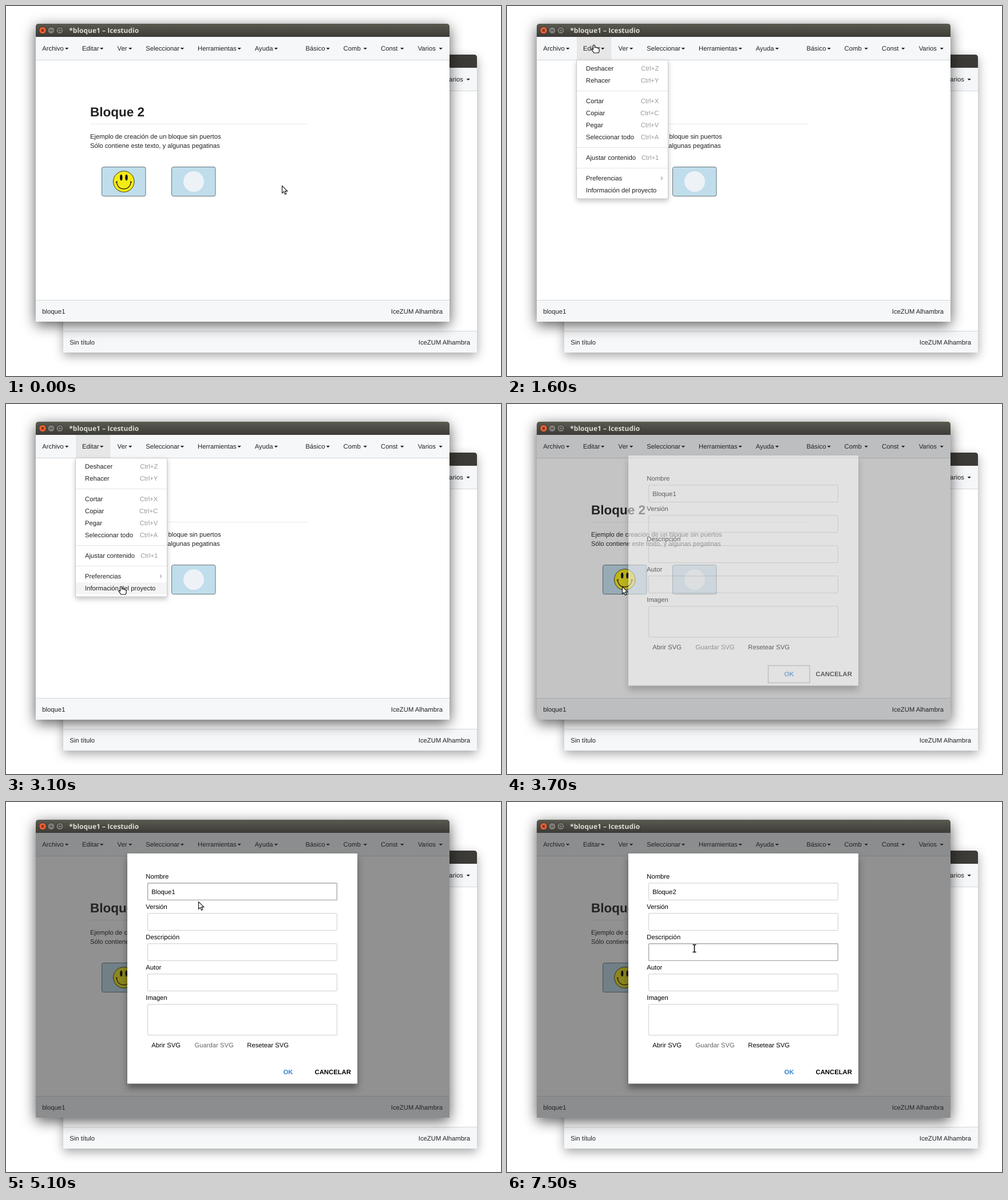
An HTML page for the animation above (8 s loop, 865x647 px).

```html
<!DOCTYPE html>
<html lang="es">
<head>
<meta charset="utf-8">
<title>Icestudio</title>
<style>
  html, body { margin: 0; width: 100%; height: 100%; overflow: hidden; background: #fff; }
  svg { display: block; width: 865px; height: 647px; }
  text { font: 11.27px "Liberation Sans", Arial, sans-serif; fill: #222; white-space: pre; text-rendering: geometricPrecision; }
  .title { font: bold 12px "Open Sans", "Noto Sans", sans-serif; fill: #dfdbd2; }
  .head { font-size: 22.5px; font-weight: bold; }
  .bold { font-weight: bold; }
  .key { fill: #999; }
  .front { filter: drop-shadow(0 6px 12px rgba(0, 0, 0, .65)); }
  .back { filter: drop-shadow(0 6px 9px rgba(0, 0, 0, .35)); }
  .popup { filter: drop-shadow(0 4px 4px rgba(0, 0, 0, .22)); }
  .sheet { filter: drop-shadow(0 8px 6px rgba(0, 0, 0, .38)); }
  .bar { fill: #f5f7f9; }
  .line { fill: #d3d7da; }
  .sticker { fill: #c0ddeb; stroke: #68747b; }
  .field { fill: #fff; stroke: #ccc; }
  .field.focus { stroke: #aaa; stroke-width: 1.4; }
  #modal text { fill: #000; }
  #modal .off { fill: #666; }
  #modal .ok { fill: #3a87cf; }
</style>
</head>
<body>
<svg id="stage" viewBox="0 0 865 647" xmlns="http://www.w3.org/2000/svg"></svg>
<script>
const rect = (x, y, w, h, attrs = '') => `<rect x="${x}" y="${y}" width="${w}" height="${h}" ${attrs}/>`;
const text = (x, y, s, cls = '', anchor = 'start') =>
  `<text x="${x}" y="${y}" class="${cls}" text-anchor="${anchor}">${s}</text>`;

// label, text x, arrow x
const navItems = [
  ['Archivo', 63.3, 103], ['Editar', 133, 164], ['Ver', 194.5, 214],
  ['Seleccionar', 244.2, 304.7], ['Herramientas', 335, 404.5], ['Ayuda', 434.8, 468.7],
  ['Básico', 523.6, 559.5], ['Comb', 589.6, 624.5], ['Const', 655, 689], ['Varios', 719.7, 756.5]
];
const nav = navItems.map(([s, x, ax]) =>
  text(x, 78, s) + `<path d="M${ax},73h6.4l-3.2,3.3z" fill="#222"/>`).join('');

function windowFrame(cls, titleFill, file) {
  return rect(52, 31, 723, 521, `rx="4" fill="#fff" class="${cls}"`) +
    `<path d="M52,54V36q0,-5 5,-5H770q5,0 5,5V54z" fill="${titleFill}"/>` +
    rect(52, 54, 723, 498, 'fill="#fff"') +
    rect(52, 54, 723, 40, 'class="bar"') + rect(52, 94, 723, 1, 'class="line"') +
    rect(52, 515, 723, 37, 'class="bar"') + rect(52, 514, 723, 1, 'class="line"') +
    `<rect class="hot" x="122" y="54" width="60.5" height="40" fill="#e7e7e7" visibility="hidden"/>` +
    nav + text(63.3, 537.5, file) + text(763, 537.5, 'IceZUM Alhambra', '', 'end');
}

const titleButtons =
  '<circle cx="64" cy="42.6" r="6.3" fill="#ea6236" stroke="#33322e"/>' +
  '<path d="M61.8,40.4l4.4,4.4m0,-4.4l-4.4,4.4" stroke="#5a2413" stroke-width="1.3"/>' +
  '<g fill="#7d7b73" stroke="#33322e"><circle cx="79" cy="42.6" r="6.3"/><circle cx="94" cy="42.6" r="6.3"/></g>' +
  '<path d="M76.5,42.6h5M91.8,40.4h4.4v4.4h-4.4z" fill="none" stroke="#3a3935" stroke-width="1.1"/>';

const smiley =
  '<circle cx="205.8" cy="307" r="18.3" fill="#f6ea16" stroke="#2a2a10" stroke-width=".9"/>' +
  '<ellipse cx="201.3" cy="300" rx="2.1" ry="5.2"/><ellipse cx="210.5" cy="300" rx="2.1" ry="5.2"/>' +
  '<path d="M193.3,307.5Q195,319.8 205.8,319.8T218.3,307.5M191.8,308.3l3,-1.4M219.8,308.3l-3,-1.4" fill="none" stroke="#111" stroke-width="1.3"/>';

const page =
  text(147, 193, 'Bloque 2', 'head') + rect(147, 206, 380, 1, 'fill="#e9e9e9"') +
  text(147, 231.5, 'Ejemplo de creación de un bloque sin puertos') +
  text(147, 248.3, 'Sólo contiene este texto, y algunas pegatinas') +
  rect(167.5, 281.5, 76.5, 51, 'rx="3" class="sticker"') + smiley +
  rect(289.5, 281.5, 76.5, 51, 'rx="3" class="sticker"') +
  '<circle cx="328" cy="307" r="18" fill="#edf2f7"/>';

// label, baseline, shortcut
const menuItems = [
  ['Deshacer', 113, 'Ctrl+Z'], ['Rehacer', 134, 'Ctrl+Y'], ['Cortar', 170, 'Ctrl+X'],
  ['Copiar', 191, 'Ctrl+C'], ['Pegar', 212, 'Ctrl+V'], ['Seleccionar todo', 233, 'Ctrl+A'],
  ['Ajustar contenido', 269, 'Ctrl+1'], ['Preferencias', 305, ''], ['Información del proyecto', 326, '']
];
const menu = rect(121.5, 94.5, 160, 242.5, 'rx="2" fill="#fff" stroke="#c9c9c9" class="popup"') +
  rect(122, 0, 159, 21, 'id="row" fill="#f4f4f4"') +
  [148, 247, 283].map(y => rect(122, y, 159, 1, 'fill="#e5e5e5"')).join('') +
  menuItems.map(([s, y, k]) => text(138, y, s) + text(265.3, y, k, 'key', 'end')).join('') +
  '<path d="M269,297l4.3,4.2l-4.3,4.2z" fill="#ccc"/>';

const labels = ['Nombre', 'Versión', 'Descripción', 'Autor', 'Imagen'];
const modal = rect(212, 90, 402, 402.5, 'rx="1" fill="#fff" class="sheet"') +
  labels.map((s, i) => text(244.3, 134 + 53 * i, s) +
    rect(247.7, 141.8 + 53 * i, 330.6, i < 4 ? 29.6 : 54, 'rx="1" class="field"')).join('') +
  text(254.3, 160.5, '', 'name') +
  text(254.3, 429, 'Abrir SVG') + text(329.5, 429, 'Guardar SVG', 'off') + text(421.3, 429, 'Resetear SVG') +
  rect(456.5, 457.5, 72.5, 30, 'id="okFocus" fill="none" stroke="#bbb" stroke-width="1.5"') +
  text(484.6, 476.3, 'OK', 'bold ok') + text(539.6, 476.3, 'CANCELAR', 'bold') +
  rect(0, 0, 1, 13, 'id="caret"');

const cursors =
  '<path id="arrow" d="M.5,.5V13.2L3.5,10.4L5.6,15.2L7.8,14.2L5.8,9.6H9.8Z" fill="#fff" stroke="#111" stroke-width="1.1"/>' +
  '<path id="hand" d="M-1.5,8V1.2Q-1.5,0 0,0T1.5,1.2V4.5Q2,3.8 3.2,4T4.5,5Q5.5,4.4 6.5,5T7.3,6Q9.2,5.8 9.2,8V11L8,14H0L-4,8.5Q-4,6.8 -2.5,7.2Z" fill="#fff" stroke="#111" stroke-width="1.2"/>' +
  '<path id="beam" d="M-3,-6.5H-1L0,-5.5L1,-6.5H3M0,-5.5V5.5M-3,6.5H-1L0,5.5L1,6.5H3" fill="none" stroke="#111" stroke-width="1.6"/>';

const stage = document.getElementById('stage');
stage.innerHTML =
  '<defs><linearGradient id="bar" x2="0" y2="1"><stop stop-color="#5a5a50"/><stop offset="1" stop-color="#3c3b37"/></linearGradient></defs>' +
  `<g transform="translate(48 54)">${windowFrame('back', '#3c3b37', 'Sin título')}</g>` +
  `<g id="app">${windowFrame('front', 'url(#bar)', 'bloque1')}${titleButtons}` +
  text(110.3, 46.8, '*bloque1 – Icestudio', 'title') + page + '</g>' +
  `<g id="menu">${menu}</g>` + rect(52, 54, 723, 498, 'id="dim" fill="#252525"') +
  `<g id="modal">${modal}</g><g id="pointer">${cursors}</g>`;

const $ = s => stage.querySelector(s);
const show = (el, on) => el.setAttribute('visibility', on ? 'visible' : 'hidden');
const hot = $('#app .hot'), row = $('#row'), menuEl = $('#menu'), dim = $('#dim'), modalEl = $('#modal');
const fields = [...stage.querySelectorAll('.field')];
const name = $('.name'), caret = $('#caret'), okFocus = $('#okFocus'), pointer = $('#pointer');
const shapes = ['arrow', 'hand', 'beam'].map(id => $('#' + id));

// time, x, y of the pointer's hot spot
const path = [
  [0, 482, 314], [300, 482, 314], [1200, 180, 92], [1500, 152, 68], [1800, 152, 68],
  [2400, 203, 239], [3000, 203, 239], [3100, 201, 319], [4000, 201, 319], [4300, 294, 172],
  [4400, 294, 172], [4500, 303.5, 161], [4700, 303.5, 161], [4800, 318.5, 162], [5000, 318.5, 162],
  [5100, 336, 174], [6300, 336, 174], [6500, 333, 218], [6600, 333, 218], [6700, 329, 225],
  [7100, 329, 225], [7200, 327.5, 256], [8000, 327.5, 256]
];
const shapeAt = [[0, 'arrow'], [1300, 'hand'], [3700, 'arrow'], [4500, 'beam'], [5100, 'arrow'],
  [6500, 'beam'], [6700, 'arrow'], [7200, 'beam']];
const names = [[0, 'Bloque1'], [5600, 'Bloque'], [5800, 'Bloque2']];
// time, x, y; no x hides the caret
const carets = [[0], [4600, 296, 150], [5100], [5600, 290, 150], [5800, 296.4, 150], [6200],
  [7200, 255, 256], [7500]];
const at = (list, t) => list.findLast(k => k[0] <= t);

function position(t) {
  const i = path.findIndex(k => k[0] > t);
  const [t0, x0, y0] = path[i - 1], [t1, x1, y1] = path[i];
  const p = (t - t0) / (t1 - t0), e = (1 - Math.cos(Math.PI * p)) / 2;
  return [x0 + (x1 - x0) * e, y0 + (y1 - y0) * e];
}

function draw(now) {
  const t = Math.floor(now % 8000 / 100) * 100;
  const [x, y] = position(t);
  pointer.setAttribute('transform', `translate(${x} ${y})`);
  const shape = at(shapeAt, t)[1];
  shapes.forEach(s => show(s, s.id === shape));

  const open = t >= 1600 && t < 3700;
  show(hot, t >= 1300 && t < 3700);
  menuEl.style.display = open ? '' : 'none';
  const item = menuItems.find(m => y >= m[1] - 14 && y < m[1] + 7);
  row.style.display = item ? '' : 'none';
  if (item) row.setAttribute('y', item[1] - 14);

  dim.setAttribute('opacity', t < 3700 ? 0 : t < 3800 ? .27 : .5);
  modalEl.setAttribute('opacity', t < 3700 ? 0 : t < 3800 ? .52 : 1);
  show(okFocus, t < 4600);
  fields[0].classList.toggle('focus', t >= 4600 && t < 7200);
  fields[2].classList.toggle('focus', t >= 7200);
  name.textContent = at(names, t)[1];

  const [, cx, cy] = at(carets, t);
  show(caret, cx);
  if (cx) {
    caret.setAttribute('x', cx);
    caret.setAttribute('y', cy);
  }
}

const start = performance.now();
function tick() {
  draw(performance.now() - start);
  requestAnimationFrame(tick);
}
tick();
</script>
</body>
</html>
```
